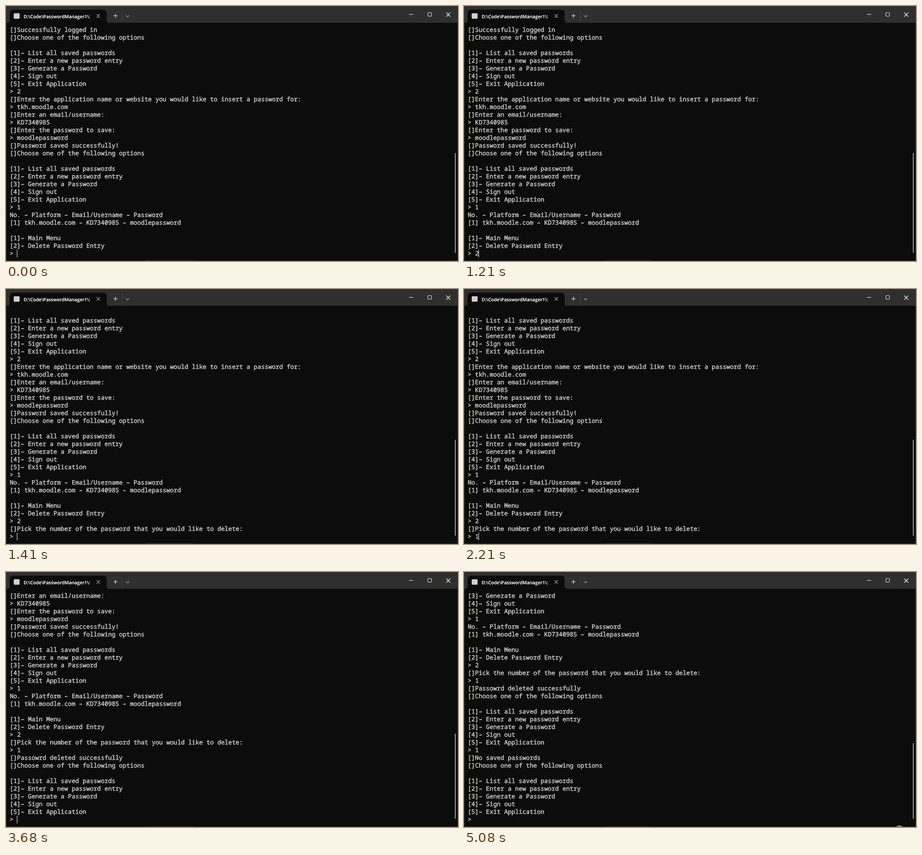
These frames come from a looping animation (997x562 px, 5150 ms). An HTML page:

```html
<!DOCTYPE html>
<html lang="en">
<head>
<meta charset="utf-8">
<title>Terminal</title>
<style>
html, body { margin: 0; width: 100%; height: 100%; overflow: hidden; background: #0c0c0c; }
svg { display: block; }
text { text-rendering: geometricPrecision; }
#log text {
  font: 500 13.4px "Noto Sans Mono", "DejaVu Sans Mono", monospace;
  fill: #ccc; stroke: #ccc; stroke-width: .5px;
}
.title {
  font: 600 10.2px "Open Sans", "Noto Sans", sans-serif;
  fill: #fff; stroke: #fff; stroke-width: .2px;
}
.line { fill: none; stroke: #fff; stroke-width: 1; }

#log, #caret, #blink, #thumb, #mouse, #close, #dot, .key { animation: 5150ms step-end infinite; }

#log { animation-name: scroll; }
@keyframes scroll {
  0% { transform: translateY(0); }
  26.019% { transform: translateY(-17px); }
  27.378% { transform: translateY(-34px); }
  49.32% { transform: translateY(-187px); }
  76.699%, 100% { transform: translateY(-340px); }
}

#caret { animation-name: caret; }
@keyframes caret {
  0%, 27.378%, 49.32%, 76.699%, 100% { transform: translateX(24px); }
  22.135%, 42.912%, 72.815% { transform: translateX(32px); }
  26.019% { transform: translateX(8px); }
}

#blink { animation-name: blink; }
@keyframes blink {
  0%, 15.533%, 42.912%, 71.456% { visibility: visible; }
  5.242%, 39.029%, 60.97%, 88.349%, 100% { visibility: hidden; }
  49.32% { visibility: visible; }
}

.k1 { animation-name: key1; }
.k2 { animation-name: key2; }
.k3 { animation-name: key3; }
@keyframes key1 { 0% { visibility: hidden; } 22.135%, 100% { visibility: visible; } }
@keyframes key2 { 0% { visibility: hidden; } 42.912%, 100% { visibility: visible; } }
@keyframes key3 { 0% { visibility: hidden; } 72.815%, 100% { visibility: visible; } }

/* the thumb shrinks from the top as the history grows */
#thumb { animation-name: thumb; }
@keyframes thumb {
  0% { y: 324px; height: 220px; }
  27.378% { y: 332px; height: 212px; }
  49.32% { y: 356px; height: 188px; }
  78.058%, 100% { y: 377px; height: 167px; }
}

#mouse { animation-name: mouse; }
@keyframes mouse {
  0% { visibility: hidden; transform: translate(960px, 556px); }
  2.524% { visibility: visible; transform: translate(950px, 552px); }
  3.883% { visibility: visible; transform: translate(912px, 544px); }
  5.242% { visibility: visible; transform: translate(862px, 535px); }
  6.407% { visibility: visible; transform: translate(812px, 527px); }
  7.767% { visibility: visible; transform: translate(772px, 521px); }
  8.932% { visibility: visible; transform: translate(748px, 518px); }
  10.291%, 31.262% { visibility: visible; transform: translate(738px, 516px); }
  23.495%, 42.912% { visibility: hidden; transform: translate(738px, 516px); }
  88.349% { visibility: visible; transform: translate(750px, 515px); }
  90.291% { visibility: visible; transform: translate(786px, 512px); }
  92.233% { visibility: visible; transform: translate(811px, 509px); }
  98.64%, 100% { visibility: hidden; transform: translate(811px, 509px); }
}

#close { stroke-width: 1.25; animation-name: tint; }
@keyframes tint {
  0%, 98.64%, 100% { stroke: #fff; }
  2.524% { stroke: #fdfdd4; }
}

#dot { animation-name: dot; }
@keyframes dot {
  0% { visibility: hidden; }
  98.64%, 100% { visibility: visible; }
}
</style>
</head>
<body>
<svg width="997" height="562" viewBox="0 0 997 562">
  <rect width="997" height="562" fill="#0c0c0c"/>
  <rect width="997" height="37" fill="#2f2f2f"/>
  <path d="M3 37q5 0 5-5V16q0-8 8-8H214q8 0 8 8V32q0 5 5 5z" fill="#0c0c0c"/>
  <rect x="17" y="16" width="13" height="12" rx="2" fill="#cfcfcf"/>
  <text class="title" x="39" y="27">D:\Code\PasswordManager1\:</text>
  <path class="line" d="M199.5 18l8 8m0-8l-8 8" stroke-width="1.25"/>
  <path class="line" d="M237 21.5h9m-4.5-4.5v9M264.5 20.5l3.7 3.7 3.7-3.7"/>
  <path d="M256.5 12v20" stroke="#464646"/>
  <path class="line" d="M889 18.5h9"/>
  <rect class="line" x="930.5" y="14.5" width="8" height="8" rx="1"/>
  <path class="line" id="close" d="M971 14.5l9 9m0-9l-9 9"/>

  <svg y="44" width="997" height="510" viewBox="0 44 997 510">
    <g id="log"></g>
  </svg>

  <g id="caret"><rect id="blink" y="537" width="1" height="17" fill="#fff"/></g>
  <rect id="thumb" x="990" y="324" width="2" height="220" rx="1" fill="#9d9d9d"/>
  <path d="M.5 .5h996v561H.5z" fill="none" stroke="#3c3c3c"/>
  <path d="M310 561.5h102" stroke="#555"/>
  <path class="line" id="mouse" style="stroke:#ccc" d="M-3 -6.5h2.5l1 1 1-1H4M.5 -5.5v12M-3 7.5h2.5l1-1 1 1H4"/>
  <circle id="dot" cx="960.5" cy="568" r="10" fill="#777"/>
</svg>
<script>
const NS = "http://www.w3.org/2000/svg";
const menu = [
  "[]Choose one of the following options",
  "",
  "[1]– List all saved passwords",
  "[2]– Enter a new password entry",
  "[3]– Generate a Password",
  "[4]– Sign out",
  "[5]– Exit Application"
];
// "|" splits off a key typed during the loop
const lines = [
  "[]Successfully logged in",
  ...menu,
  "> 2",
  "[]Enter the application name or website you would like to insert a password for:",
  "> tkh.moodle.com",
  "[]Enter an email/username:",
  "> KD7340985",
  "[]Enter the password to save:",
  "> moodlepassword",
  "[]Password saved successfully!",
  ...menu,
  "> 1",
  "No. – Platform – Email/Username – Password",
  "[1] tkh.moodle.com – KD7340985 – moodlepassword",
  "",
  "[1]– Main Menu",
  "[2]– Delete Password Entry",
  "> |2",
  "[]Pick the number of the password that you would like to delete:",
  "> |1",
  "[]Passowrd deleted successfully",
  ...menu,
  "> |1",
  "[]No saved passwords",
  ...menu,
  ">"
];

const log = document.getElementById("log");
let keys = 0;

function put(str, col, row, cls) {
  const el = document.createElementNS(NS, "text");
  el.setAttribute("x", 8.3 + col * 8.04);
  el.setAttribute("y", 57 + row * 17);
  if (cls) el.setAttribute("class", cls);
  el.textContent = str;
  log.append(el);
}

lines.forEach((line, row) => {
  const [str, key] = line.split("|");
  if (str) put(str, 0, row);
  if (key) put(key, 2, row, "key k" + ++keys);
});
</script>
</body>
</html>
```
